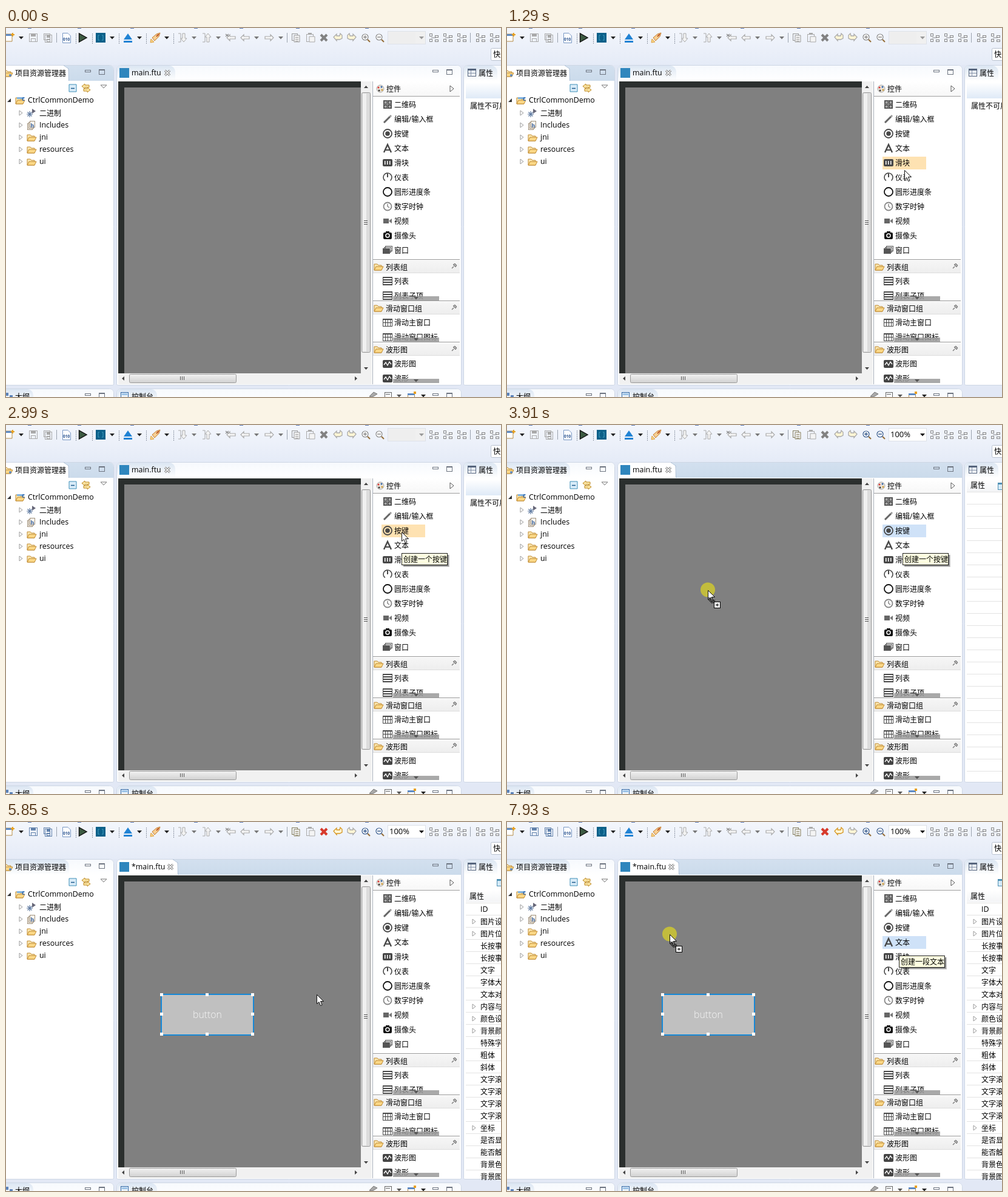
Write an HTML page with a canvas that moves like this. It is 816 px wide and 608 px high and loops after 8000 ms.

```html
<!DOCTYPE html>
<html lang="zh-CN">
<head>
<meta charset="utf-8">
<title>Editor demo</title>
<style>
html, body { margin: 0; width: 100%; height: 100%; overflow: hidden; background: #e2e8f5; }
canvas { display: block; width: 816px; height: 608px; }
</style>
</head>
<body>
<canvas id="stage" width="816" height="608"></canvas>
<script>
const g = document.getElementById('stage').getContext('2d');
const LOOP = 8000;
const SANS = '"Open Sans", "Noto Sans CJK SC", "Noto Sans CJK JP", "Noto Sans CJK", sans-serif';

// ---- drawing helpers ----
function box(x, y, w, h, c) { g.fillStyle = c; g.fillRect(x, y, w, h); }
function frame(x, y, w, h, c) { g.strokeStyle = c; g.lineWidth = 1; g.strokeRect(x + .5, y + .5, w - 1, h - 1); }
function path(pts, fill, stroke, width = 1, close = true) {
  g.beginPath();
  for (let i = 0; i < pts.length; i += 2) g.lineTo(pts[i], pts[i + 1]);
  if (close) g.closePath();
  if (fill) { g.fillStyle = fill; g.fill(); }
  if (stroke) { g.strokeStyle = stroke; g.lineWidth = width; g.stroke(); }
}
function line(pts, c, w = 1) { path(pts, null, c, w, false); }
function disc(x, y, r, fill, stroke, w = 1) {
  g.beginPath(); g.arc(x, y, r, 0, Math.PI * 2);
  if (fill) { g.fillStyle = fill; g.fill(); }
  if (stroke) { g.strokeStyle = stroke; g.lineWidth = w; g.stroke(); }
}
function text(s, x, cy, c = '#000', size, weight = 400) {
  const latin = /^[\x00-\x7f]+$/.test(s);
  g.font = `${weight} ${size || (latin ? 12.4 : 12)}px ${SANS}`;
  g.fillStyle = c;
  g.fillText(s, x, cy + (latin ? 4 : 5));
}
function grad(y0, y1, a, b) {
  const k = g.createLinearGradient(0, y0, 0, y1);
  k.addColorStop(0, a); k.addColorStop(1, b);
  return k;
}
function round(x, y, w, h, r, fill, stroke) {
  g.beginPath(); g.roundRect(x, y, w, h, r);
  if (fill) { g.fillStyle = fill; g.fill(); }
  if (stroke) { g.strokeStyle = stroke; g.lineWidth = 1; g.stroke(); }
}
function at(x, y, draw) { g.save(); g.translate(x, y); draw(); g.restore(); }
function drop(x, y = 16, c = '#222') { path([x - 4, y - 2, x + 4, y - 2, x, y + 2.5], c); }
function winButtons(x, y) {
  frame(x, y - 3, 10, 4, '#6d7480');
  frame(x + 23, y - 4, 10, 9, '#6d7480'); box(x + 23, y - 4, 10, 2, '#6d7480');
}
function folder(x, y) {
  path([x - 7, y + 5, x - 7, y - 5, x - 2, y - 5, x, y - 3, x + 5, y - 3, x + 5, y + 5], '#fbe7b0', '#c08a30');
  path([x - 7, y + 5, x - 4, y - 1, x + 8, y - 1, x + 5, y + 5], '#fbd887', '#c08a30');
}

// ---- palette ----
const DARK = '#484848';
const icons = {
  code() { box(-7, -7, 14, 14, '#555'); for (const a of [-5, 2]) for (const b of [-5, 2]) frame(a, b, 3, 3, '#c4c4c4'); box(-1, -6, 1, 12, '#999'); box(-6, -1, 12, 1, '#999'); },
  pen() { line([-6, 6, 4, -4], '#666', 3); line([4, -4, 6, -6], '#999', 3); },
  radio() { disc(0, 0, 7, null, DARK, 1.8); disc(0, 0, 3.8, DARK); },
  letter() { line([-6, 7, 0, -6, 6, 7], DARK, 2.4); line([-4, 3, 4, 3], DARK, 2); },
  slider() { round(-8, -6, 16, 12, 2, DARK); for (const a of [-4, 0, 4]) box(a - 1, -3, 1.5, 6, '#fff'); },
  gauge() { g.beginPath(); g.arc(0, 0, 7, 2.2, .9); g.strokeStyle = DARK; g.lineWidth = 1.6; g.stroke(); line([0, 0, 0, -6], DARK, 2); },
  ring() { disc(0, 0, 7, null, '#111', 1.8); },
  clock() { disc(0, 0, 6.5, null, '#888', 1.8); line([0, -4, 0, 0, 3, 2], '#777', 1.3); },
  video() { box(-7, -4, 9, 8, '#666'); path([2, 0, 7, -4, 7, 4], '#777'); },
  camera() { round(-7, -5, 14, 11, 2, '#111'); box(-3, -7, 6, 3, '#111'); disc(0, 0, 3, null, '#fff', 1.5); },
  pane() { frame(-4, -7, 12, 9, '#555'); frame(-6, -5, 12, 9, '#555'); box(-8, -3, 12, 9, '#555'); },
  list() { frame(-8, -7, 16, 14, DARK); for (const b of [-7, -3, 1, 5]) box(-8, b, 16, 2, DARK); },
  grid() { frame(-8, -6, 16, 13, DARK); box(-8, -6, 16, 2, DARK); for (const a of [-4, 0, 4]) box(a, -6, 1, 12, DARK); box(-8, 0, 16, 1, DARK); },
  wave() { round(-8, -6, 16, 13, 2, '#444'); line([-6, 2, -3, -2, 0, 3, 3, -3, 6, 1], '#fff', 1.3); }
};
const rows = [
  ['二维码', 'code'], ['编辑/输入框', 'pen'], ['按键', 'radio'], ['文本', 'letter'], ['滑块', 'slider'],
  ['仪表', 'gauge'], ['圆形进度条', 'ring'], ['数字时钟', 'clock'], ['视频', 'video'], ['摄像头', 'camera'], ['窗口', 'pane']
].map(([name, icon], i) => ({ name, icon, y: 126 + 24 * i, end: 380 }));
const groups = [['列表组', '列表', '列表子项', 'list'], ['滑动窗口组', '滑动主窗口', '滑动窗口图标', 'grid'], ['波形图', '波形图', '波形', 'wave']];
groups.forEach(([, a, b, icon], i) => {
  const y = 417 + 68 * i, end = Math.min(449 + 68 * i, 586);
  rows.push({ name: a, icon, y, end }, { name: b, icon, y: y + 24, end });
});

function palette(lit, color) {
  box(604, 88, 146, 499, '#fff');
  box(604, 88, 1, 499, '#a9b0ba');
  box(605, 88, 143, 24, grad(88, 112, '#fff', '#f7f7f7'));
  box(605, 112, 143, 1, '#a0a0a0');
  disc(617, 100, 6, '#e9e2d8', '#aaa');
  [['#d33', -3, -2], ['#36a', 2, -3], ['#333', -2, 3], ['#c93', 3, 2]].forEach(([c, a, b]) => disc(617 + a, 100 + b, 1.5, c));
  text('控件', 627, 100);
  path([732, 95, 738, 100, 732, 105], '#fff', '#555');
  for (const r of rows) {
    g.save();
    g.beginPath(); g.rect(605, 88, 144, r.end - 88); g.clip();
    if (r === lit) {
      g.font = '12px ' + SANS;
      box(619, r.y - 10, 48 + Math.round(g.measureText(r.name).width), 21, color);
    }
    at(629, r.y, icons[r.icon]);
    text(r.name, 640, r.y);
    g.restore();
  }
  groups.forEach(([name], i) => {
    const y = 381 + 68 * i;
    box(605, y, 143, 1, '#999');
    box(605, y + 2, 143, 20, grad(y + 2, y + 22, '#f6f6f6', '#eee'));
    box(605, y + 22, 143, 1, '#ddd');
    folder(614, y + 13);
    text(name, 626, y + 13);
    line([735, y + 15, 738, y + 12], '#777', 1.3);
    path([737, y + 9, 741, y + 13, 743, y + 10, 740, y + 7], '#aaa', '#777');
    box(638, y + 61, 76, 7, 'rgba(155,155,155,.85)');
    drop(676, y + 64, '#555');
  });
}

// ---- window parts ----
function tool(x, color, kind) {
  at(x, 16, () => {
    if (kind === 'save') {
      frame(-7, -7, 14, 14, color); box(-4, -7, 8, 5, color); frame(-4, 1, 8, 6, color);
    } else if (kind === 'saves') {
      frame(-7, -7, 11, 11, color); frame(-5, -5, 12, 13, color); box(-2, -4, 6, 4, color); frame(-2, 2, 6, 5, color);
    } else if (kind === 'copy') {
      frame(-7, -7, 10, 12, color); path([-3, -4, 6, -4, 6, 7, -3, 7], '#f4f4f4', color);
      for (const b of [-1, 2, 5]) box(-1, b, 5, 1, color);
    } else if (kind === 'paste') {
      frame(-7, -6, 12, 13, color); box(-4, -8, 6, 3, color); path([-2, -2, 7, -2, 7, 7, -2, 7], '#f4f4f4', color);
    } else if (kind === 'cross') {
      line([-5, -5, 5, 5], color, 4); line([5, -5, -5, 5], color, 4);
    } else if (kind === 'undo' || kind === 'redo') {
      if (kind === 'redo') g.scale(-1, 1);
      path([-7, -1, -2, -6, -2, -3, 3, -3, 4, -7, 7, -4, 7, 1, 3, 3, -2, 3, -2, 5], '#fff6d5', color, 1.3);
    } else if (kind === 'left' || kind === 'right') {
      if (kind === 'right') g.scale(-1, 1);
      path([-7, 0, -2, -5, -2, -2, 7, -2, 7, 2, -2, 2, -2, 5], '#f6f6f6', color, 1.2);
    } else if (kind === 'in' || kind === 'out') {
      line([3, 3, 7, 7], '#98713c', 2.2);
      disc(-1, -1, 5, '#fff', color, 1.2); line([-4, -1, 2, -1], color, 1.4);
      if (kind === 'in') line([-1, -4, -1, 2], color, 1.4);
    } else if (kind === 'down' || kind === 'up') {
      if (kind === 'up') g.scale(1, -1);
      line([-7, -7, -3, -7, -3, 7, -7, 7], color, 1);
      path([0, -7, 4, -7, 4, 1, 7, 1, 2, 7, -3, 1, 0, 1], '#f4f4f4', color);
    } else if (kind === 'align') {
      frame(-7, -7, 5, 5, color); frame(-7, 2, 5, 5, color); frame(2, -4, 6, 4, color); frame(2, 3, 6, 4, color);
      line([-4, 0, 4, 0], color);
    }
  });
}

function toolbar(live, dirty) {
  box(0, 0, 816, 61, grad(0, 61, '#f3f6fc', '#e5ebf7'));
  for (const x of [36, 118, 205, 310, 385, 478, 592]) box(x, 0, 6, 1, '#5b79b5');
  for (const x of [83, 463, 765]) box(x, 8, 1, 16, '#9aa2ae');
  for (const x of [115, 142, 186, 231, 276]) for (let y = 9; y < 25; y += 3) box(x, y, 1, 2, '#8f97a5');
  const dim = '#aaa', blue = '#6383ad', gray = '#888';
  path([-4, 10, 10, 10, 10, 22, -4, 22], '#fff', '#b48a45'); box(-4, 10, 14, 3, '#5d8ac4');
  line([11, 8, 11, 14], '#e8a020', 2); line([8, 11, 14, 11], '#e8a020', 2);
  tool(45, dirty ? blue : dim, 'save');
  tool(69, dirty ? blue : dim, 'saves');
  path([93.5, 8.5, 102, 8.5, 106.5, 13, 106.5, 24.5, 93.5, 24.5], '#fff', '#7897c4');
  text('010', 94, 17, '#234d8c', 6.5, 700);
  path([120.5, 9, 120.5, 23, 133, 16], '#3c5a42', '#111', 1.4);
  box(148, 8, 16, 16, '#0b6089');
  line([154, 12, 152, 12, 152, 20, 154, 20], '#3f9abf'); line([158, 12, 160, 12, 160, 20, 158, 20], '#3f9abf');
  path([194, 19, 201, 9, 208, 19], '#2183d4'); box(194, 21, 14, 3, '#2183d4');
  path([238, 24, 239, 18, 244, 23], '#f6d488', '#e0a040');
  path([241, 16, 248, 10, 254, 8, 252, 14, 245, 21], '#f6cf92', '#c67a2c');
  line([248, 14, 252, 10], '#b9552a', 2);
  for (const x of [25, 175, 220, 265]) drop(x);
  tool(291, dim, 'down'); tool(331, dim, 'up');
  tool(371, dim, 'left'); line([362, 10, 367, 14], gray, 1.2); line([367, 10, 362, 14], gray, 1.2);
  tool(394, dim, 'left'); tool(434, dim, 'right');
  for (const x of [310, 350, 413, 453]) drop(x, 16, '#777');
  tool(478, live ? '#847c5b' : '#999', 'copy');
  tool(502, '#aaa', 'paste');
  tool(524, dirty ? '#d73a2c' : '#828282', 'cross');
  tool(547, dirty ? '#d69520' : dim, 'undo');
  tool(570, dim, 'redo');
  tool(593, live ? '#34588c' : gray, 'in');
  tool(616, live ? '#34588c' : gray, 'out');
  box(629, 5, 63, 22, live ? '#fff' : '#f0f0f0');
  frame(629, 5, 63, 22, '#dde1e8');
  if (!live) box(631, 7, 44, 18, '#eee');
  if (live) text('100%', 632, 16, '#000', 13);
  drop(685, 16, live ? '#111' : '#999');
  for (const x of [705, 728, 751, 782, 805]) tool(x, gray, 'align');
  round(799.5, 33.5, 40, 20, 2, '#fff', '#b9c2d0');
  text('快速访问', 803, 43);
}

function panel(x, y, w, h, on, tabW) {
  round(x + .5, y + .5, w, h, [7, 7, 2, 2], '#fff', '#cdd6e4');
  round(x + 1, y + 1, w - 1, 25, [6, 6, 0, 0], on ? grad(y, y + 26, '#d3e0ef', '#cbdbeb') : grad(y, y + 26, '#f6f9fd', '#fff'));
  round(x + 1, y + 1, tabW, 26, [6, 10, 0, 0], on ? '#fff' : grad(y, y + 26, '#dae5f2', '#fff'));
  if (on) line([x + tabW - 8, y + .5, x + tabW, y + 6, x + tabW + .5, y + 26], '#a9bdd5');
}

function tree(live) {
  panel(-8, 61, 185, 527, !live, 111);
  folder(3, 75); disc(7, 78, 2, '#5d8ac4');
  text('项目资源管理器', 15, 74);
  winButtons(130, 72);
  path([104, 93, 116, 93, 116, 105, 104, 105], '#d9ecf8', '#3f8fb8'); line([107, 99.5, 113, 99.5], '#1d5b8d', 1.5);
  path([125, 96, 130, 92, 130, 94, 137, 94, 137, 98, 130, 98, 130, 100], '#fae3a0', '#bd8a26');
  path([139, 102, 134, 98, 134, 100, 128, 100, 128, 104, 134, 104, 134, 106], '#fae3a0', '#bd8a26');
  path([156, 94, 166, 94, 161, 99], '#fff', '#777');
  path([2, 122, 8, 122, 8, 116], '#333');
  folder(23, 120); box(18, 114, 12, 3, '#7fb1de'); text('C', 26, 116, '#2b62ac', 8, 700);
  text('CtrlCommonDemo', 36, 119);
  ['二进制', 'Includes', 'jni', 'resources', 'ui'].forEach((s, i) => {
    const y = 140 + 20 * i;
    path([22, y - 4, 27, y, 22, y + 4], '#fff', '#999');
    if (i > 1) folder(42, y + 1);
    text(s, 55, y);
  });
  for (let a = 0; a < 8; a++) line([39, 142, 39 + 5 * Math.cos(a * .785), 142 + 5 * Math.sin(a * .785)], '#5b779f', 1.2);
  path([43, 133, 49, 137, 43, 141], '#667');
  for (let a = 0; a < 3; a++) {
    box(35 + 2 * a, 157 - 2 * a, 9, 11, '#faf6ef');
    frame(35 + 2 * a, 157 - 2 * a, 9, 11, '#a0917c');
  }
  text('h', 40.5, 160, '#355e99', 9, 700);
}

function scrollbars() {
  box(585, 88, 18, 481, '#f1f1f1');
  round(586.5, 106.5, 14, 428, 2, '#dcdcdc', '#9a9a9a');
  box(588, 108, 6, 425, '#f0f0f0');
  for (const y of [317, 320, 323]) box(590, y, 6, 1, '#555');
  path([590, 99, 597, 99, 593.5, 95], '#444'); path([590, 559, 597, 559, 593.5, 563], '#444');
  box(185, 569, 418, 18, '#f1f1f1');
  round(203.5, 570.5, 176, 14, 2, grad(570, 585, '#f3f3f3', '#d0d0d0'), '#9a9a9a');
  for (const x of [287, 290, 293]) box(x, 574, 1, 6, '#555');
  path([195, 574, 195, 581, 191, 577.5], '#444'); path([575, 574, 575, 581, 579, 577.5], '#444');
}

function editor(live, dirty) {
  panel(182, 61, 568, 527, live, dirty ? 101 : 96);
  box(187, 66, 16, 16, '#2f86bd');
  text(dirty ? '*main.ftu' : 'main.ftu', 207, 74);
  const x = dirty ? 271 : 266;
  line([x - 4, 70, x + 4, 78], '#777', 3.4); line([x + 4, 70, x - 4, 78], '#777', 3.4);
  line([x - 4, 70, x + 4, 78], '#fff', 1.5); line([x + 4, 70, x - 4, 78], '#fff', 1.5);
  winButtons(703, 72);
  box(185, 88, 400, 481, '#2b2f2e');
  box(195, 98, 390, 471, '#808080');
  scrollbars();
  if (!dirty) return;
  box(255, 283, 154, 69, '#1688d6');
  box(257, 285, 150, 65, '#c0c0c0');
  text('button', 308, 319, '#f6f6f6', 15.8, 300);
  for (const a of [254, 329, 404]) for (const b of [282, 314, 347]) if (a !== 329 || b !== 314) box(a, b, 5, 5, '#fff');
}

const props = 'ID,>图片设置,>图片位置,长按事件,长按事件,文字,字体大小,文本对齐,>内容与间距,>颜色设置,>背景颜色,特殊字符,粗体,斜体,文字滚动,文字滚动,文字滚动,文字滚动,>坐标,是否显示,能否触摸,背景色,背景图'.split(',');
function properties(live, full) {
  panel(754, 61, 80, 527, false, 55);
  frame(761, 67, 14, 13, '#56657d'); box(761, 67, 14, 3, '#56657d');
  box(766, 70, 1, 10, '#8a96aa'); box(762, 74, 12, 1, '#8a96aa');
  text('属性', 779, 74);
  if (!live) {
    box(758, 90, 58, 26, grad(90, 116, '#fff', '#dfeaf7'));
    text('属性不可用。', 765, 128);
    return;
  }
  const top = full ? 112 : 90, iconY = full ? 94 : 95;
  box(758, top, 58, 20, grad(top, top + 20, '#fff', '#f3f4f6'));
  text('属性', 764, top + (full ? 10 : 9));
  box(809, iconY, 9, 12, '#d5eaf7'); frame(809, iconY, 9, 12, '#4f91b5'); box(809, iconY, 9, 3, '#4f91b5');
  for (let y = full ? 133 : 110; y < 588; y += 20) box(758, y, 58, 1, '#e3e3e3');
  if (full) props.forEach((s, i) => {
    const y = 144 + 20 * i;
    if (s[0] === '>') path([769, y - 4, 774, y, 769, y + 4], '#fff', '#999');
    text(s.replace('>', ''), 782, y);
  });
}

function footer() {
  panel(-8, 594, 185, 40, false, 52);
  box(0, 601, 4, 5, '#5c82b8'); box(6, 605, 5, 3, '#5c82b8');
  text('大纲', 15, 607);
  winButtons(130, 605);
  panel(182, 594, 568, 40, false, 66);
  frame(189, 600, 13, 12, '#2f67a6'); box(191, 602, 9, 3, '#9cc4e8');
  text('控制台', 207, 607);
  path([599, 607, 606, 600, 612, 603, 604, 608], '#aaa', '#777');
  frame(624, 600, 12, 12, '#666'); box(626, 603, 7, 1, '#666'); drop(648, 606, '#555');
  frame(662, 602, 12, 10, '#b48a45'); box(662, 602, 12, 3, '#5d8ac4'); box(672, 599, 4, 4, '#e8a020'); drop(688, 606);
  winButtons(703, 605);
}

function tooltip(s, x, y) {
  for (let i = 1; i < 4; i++) box(x + 3, y + 3, 73 + i, 17 + i, 'rgba(0,0,0,.2)');
  box(x, y, 76, 20, '#ffffe1');
  frame(x, y, 76, 20, '#222');
  text(s, x + 3, y + 10);
}

// ---- pointer: start, end, steps, target x, target y, ease-out power ----
const moves = [
  [70, 830, 11, 662, 272, 2], [910, 1060, 3, 654, 245, 1], [1290, 1600, 5, 656, 206, 1.5],
  [2300, 2600, 5, 652, 163, 1.5], [2990, 2990, 1, 652, 176, 1],
  [3530, 3910, 6, 331, 272, 1.1], [3990, 4060, 2, 266, 285, 1.3], [4380, 4530, 3, 257, 285, 1],
  [5700, 5850, 3, 512, 284, 1], [5925, 6380, 7, 646, 199, 2],
  [6680, 6765, 2, 635, 200, 1], [6845, 7010, 3, 442, 229, 1], [7150, 7620, 7, 291, 186, 1.5], [7930, 7930, 1, 268, 185, 1]
];
function pointer(t) {
  let x = 690, y = 607;
  for (const [t0, t1, n, tx, ty, pow] of moves) {
    if (t < t0) break;
    const step = n === 1 ? 1 : Math.min(n, Math.floor((t - t0) / (t1 - t0) * (n - 1) + .03) + 1);
    const e = 1 - Math.pow(1 - step / n, pow);
    x += (tx - x) * e; y += (ty - y) * e;
  }
  return [Math.round(x), Math.round(y)];
}

function drawPointer(x, y, pressed, drag) {
  if (pressed) disc(x, y - (drag ? .5 : 0), 12, 'rgba(214,206,40,.76)');
  if (drag && x > 585) {
    disc(x + 1, y, 7.5, null, '#222', 2.6);
    disc(x + 1, y, 7.5, null, '#ded657', .7);
    line([x - 4, y - 5, x + 6, y + 5], '#222', 2.6);
    return;
  }
  at(x + .5, y + .5, () => path([0, 0, 0, 15, 3.5, 12, 6, 18, 8.5, 17, 6, 11, 11, 11], '#fff', '#111'));
  if (!drag) return;
  for (let a = 0; a < 12; a++) for (let b = 12; b < 22; b++)
    if ((a + b) % 2 && Math.abs(b - 12 - a * .8) < 5) box(x + a, y + b, 1, 1, '#111');
  box(x + 10, y + 19, 11, 11, '#fff');
  frame(x + 10, y + 19, 11, 11, '#000');
  box(x + 13, y + 24, 5, 1, '#000'); box(x + 15, y + 22, 1, 5, '#000');
}

function draw(t) {
  const live = t >= 3530, dirty = t >= 5310;
  const dragA = t >= 3460 && t < 5310, dragB = t >= 6680;
  const [x, y] = pointer(t);
  let lit = null, color = '#fee2b2';
  if (dragA || dragB) { lit = rows[dragA ? 2 : 3]; color = '#cfe2f8'; }
  else if (t >= 70 && x >= 619) lit = rows.find(r => Math.abs(y - r.y) <= 12);

  box(0, 0, 816, 608, '#e2e8f5');
  toolbar(live, dirty);
  tree(live);
  editor(live, dirty);
  palette(lit, color);
  properties(live, t >= 5385);
  footer();
  if (t >= 1990 && t < 2300) tooltip('创建一段文本', 656, 227);
  if (t >= 2600 && t < 5310) tooltip('创建一个按键', 652, 211);
  if (dragB) tooltip('创建一段文本', 646, 220);
  if (t >= 70) drawPointer(x, y, t >= 3460 && t < 4830 || dragB, t >= 3530 && t < 5310 || t >= 6760);
}

const start = performance.now();
function tick() {
  draw((performance.now() - start) % LOOP);
  requestAnimationFrame(tick);
}
tick();
</script>
</body>
</html>
```
